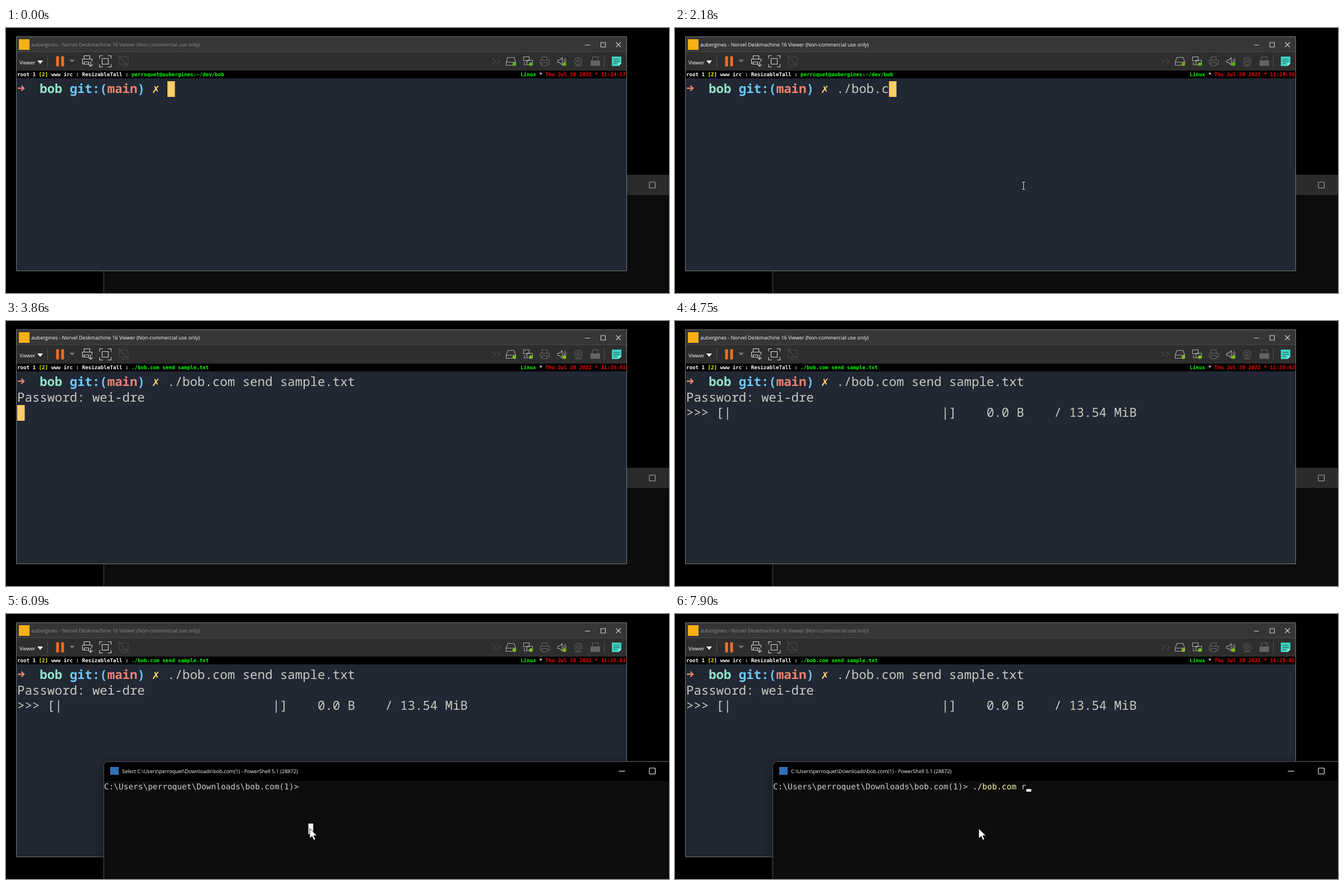
An HTML page for the animation above (8000 ms loop, 1183x473 px).

```html
<!DOCTYPE html>
<html lang="en">
<head>
<meta charset="utf-8">
<title>Sending a file between two terminals</title>
<style>
  html, body { margin: 0; width: 100%; height: 100%; overflow: hidden; background: #000; }
  svg { display: block; width: 1183px; height: 473px; }
  text { white-space: pre; text-rendering: geometricPrecision; }
  .ui { font: 9.07px "Open Sans", "Noto Sans", sans-serif; fill: #fff; }
  .bar { font: bold 9.17px "DejaVu Sans Mono", monospace; fill: #fff; }
  .term { font: 22.33px "Noto Sans Mono", monospace; fill: #cccac2; }
  .term .b { font-weight: 700; }
  .con { font: 14.43px "DejaVu Sans Mono", monospace; fill: #ccc; }
  .line { fill: none; stroke: #d4d4d4; stroke-width: 1.1; }
  .soft { stroke: #aaa; }
  .dim { stroke: #666; }
  .off { stroke: #464c50; }
  .lit { stroke: #fff; }
</style>
</head>
<body>
<svg viewBox="0 0 1183 473">
  <defs>
    <filter id="shadow" x="-10%" y="-20%" width="120%" height="140%">
      <feDropShadow dx="0" dy="6" stdDeviation="11" flood-color="#000" flood-opacity=".45"/>
    </filter>
  </defs>
  <rect width="1183" height="473"/>

  <!-- shell window while it lies behind -->
  <rect x="174" y="262" width="1020" height="220" fill="#0c0c0c"/>
  <rect x="174" y="262" width="1020" height="36" fill="#2b2b2b"/>
  <path d="M174.5 434v39" stroke="#4c4c4c"/>
  <rect x="1148" y="275" width="10.5" height="10.5" rx="1" class="line soft"/>

  <!-- virtual machine window -->
  <rect x="18" y="15" width="1090" height="419" rx="1" fill="#777"/>
  <rect x="19" y="16" width="1088" height="27" fill="#363636"/>
  <rect x="19" y="42.5" width="1088" height="34" fill="#2e2e2e"/>
  <rect x="19" y="42" width="1088" height="1" fill="#484848"/>
  <rect x="19" y="76" width="1088" height="14"/>
  <rect x="19" y="90" width="1088" height="343" fill="#212733"/>
  <rect x="23" y="20" width="19" height="19" fill="#f5b014"/>
  <text id="vmTitle" class="ui" x="45" y="33">aubergines - Norvel Deskmachine 16 Viewer (Non-commercial use only)</text>
  <path class="line" d="M1033 30.5h9M1061.5 26h8v8h-8zM1088.5 25.5l8.5 8.500m0-8.500l-8.500 8.500"/>

  <!-- toolbar -->
  <text class="ui" x="24" y="64.5">Viewer</text>
  <path d="M56 58h10l-5 6z" fill="#fff"/>
  <path d="M74.5 49v21M1067.5 49v21" stroke="#555"/>
  <path d="M89.5 50.5h5v18h-5zM98.5 50.5h5v18h-5z" fill="#f36f21"/>
  <path d="M113 56.5h10l-5 5z" fill="#777"/>
  <path class="line" d="M139.5 55v-5.5h10V55M139 64h-2.5v-8.5h17V60M139.5 60.5h8v4h-8zM151 60v8m-3.5-3l3.5 3.5 3.5-3.5"/>
  <path class="line" d="M167 54.5v-5h5.5M182 49.5h5.5v5M187.5 64.5v5H182M172.5 69.5H167v-5M171.5 54.5h11v10h-11z"/>
  <path class="line off" d="M202 51.5h16v13h-16zM200 49l19 20M206 68.5h8"/>
  <path class="line off" d="M868 55l6 4.5-6 4.5m8-9l6 4.5-6 4.5"/>
  <path class="line soft" d="M892.5 61l3-8.5h11l3 8.5v5.5h-17zM892.5 61h17"/>
  <path class="line soft" d="M923.5 51.5h10v7h-10zM929.5 57.5h10v8h-10zM925 61v5h3"/>
  <path class="line dim" d="M956.5 57v-5.5h9V57M956 64.5h-2.5v-7h16v7H966M956.5 61.5h9v6h-9z"/>
  <path class="line soft" d="M984.5 57.5h3l5-4.5v13l-5-4.5h-3zM995 56q2.5 3.5 0 7M997 53.5q4.5 6 0 11"/>
  <g class="line dim"><circle cx="1021" cy="59" r="6.5"/><circle cx="1021" cy="59" r="2.5"/><path d="M1015 67.5h12"/></g>
  <path d="M1043 58h17v9.5h-17z" fill="#646464"/>
  <path class="line dim" d="M1046.5 58v-6.5h10V58"/>
  <g id="lamps"><circle cx="907" cy="64.5" r="3.2"/><circle cx="936.5" cy="64.5" r="3.2"/><circle cx="996.5" cy="64.5" r="3.2"/></g>
  <path d="M1081 51h17v12l-5 5h-12z" fill="#3ed0c0"/>
  <path d="M1084 56h11M1084 59.5h11M1084 63h6" stroke="#1f5f5a"/>
  <path d="M1093 68v-5h5z" fill="#b9f1e9"/>

  <!-- status bar -->
  <text class="bar" x="20" y="86">root 1 <tspan fill="#ff0">[2]</tspan> www irc : ResizableTall : <tspan id="task" fill="#0f0"></tspan></text>
  <text class="bar" x="918.3" y="86"><tspan fill="#0f0">Linux</tspan> * <tspan id="clock" fill="#f00"></tspan></text>

  <!-- terminal -->
  <path d="M21 107.5h10M27.5 103l4.5 4.5-4.5 4.5" fill="none" stroke="#ec8270" stroke-width="2.3"/>
  <g class="term">
    <text class="b" x="60.2" y="116" fill="#95e6cb">bob <tspan fill="#6fc8f5">git:(</tspan><tspan fill="#ec8270">main</tspan><tspan fill="#6fc8f5">)</tspan></text>
    <text x="260" y="116" style="font:18px 'DejaVu Sans',sans-serif" fill="#ffd173">✗</text>
    <text id="typed" x="288" y="116"></text>
    <text id="secret" x="20" y="143.5">Password: wei-dre</text>
    <text id="progress" x="20" y="171"></text>
  </g>
  <rect id="block" width="13.4" height="28" fill="#ffcc66"/>

  <!-- shell window in front -->
  <g id="shell">
    <g filter="url(#shadow)">
      <rect x="174.5" y="263.5" width="1040" height="240" rx="8" fill="#0c0c0c" stroke="#555"/>
    </g>
    <path d="M175 298v-26a8 8 0 0 1 8-8h1000v34z"/>
    <rect x="186" y="273" width="15" height="14" fill="#2f6fb5"/>
    <text id="shellTitle" class="ui" x="207" y="283.7"></text>
    <path class="line lit" d="M1093.5 280.5h11"/>
    <rect x="1148" y="275" width="10.5" height="10.5" rx="1" class="line lit"/>
    <text class="con" x="175" y="313">C:\Users\perroquet\Downloads\bob.com(1)&gt; <tspan id="cmd" fill="#f9f1a5"></tspan><tspan id="arg"></tspan></text>
    <rect id="under" y="312.5" width="8.7" height="4.5" fill="#fff"/>
    <rect id="pick" x="539.5" y="374" width="8.7" height="19" fill="#f2f2f2"/>
  </g>

  <!-- pointers -->
  <g id="beam" fill="none">
    <path d="M-3-6.5h6M-3 6.5h6M0-6.5v13" stroke="#000" stroke-width="3"/>
    <path d="M-3-6.5h6M-3 6.5h6M0-6.5v13" stroke="#fff" stroke-width="1.2"/>
  </g>
  <path id="arrow" d="M0 0v17.5l4.2-3.8 3 6.8 3-1.3-3-6.6h5.8z" fill="#fff" stroke="#000" stroke-width=".8"/>
</svg>
<script>
const LOOP = 8000;
const TERM_CELL = 13.4, SHELL_CELL = 8.69;
const el = id => document.getElementById(id);
const show = (id, on) => { el(id).style.display = on ? "" : "none"; };
const put = (id, text) => { if (el(id).textContent !== text) el(id).textContent = text; };
const place = (id, x, y) => el(id).setAttribute("transform", `translate(${x} ${y})`);
const within = (t, a, b) => t >= a && t < b;
const ease = p => p * p * (3 - 2 * p);

const command = "./bob.com send sample.txt ";
const reply = "./bob.com r";

// key presses: [time, characters shown from then on]
const sendKeys = [
  [1390, 1], [1490, 2], [1590, 3], [1690, 4], [1850, 5], [1990, 6],
  [2180, 7], [2260, 8], [2350, 9], [2450, 10], [2550, 11], [2650, 12], [2750, 13], [2850, 14],
  [3050, 15], [3120, 16], [3250, 17], [3380, 26]
];
const replyKeys = [
  [6620, 1], [6750, 2], [7020, 3], [7090, 4], [7220, 5],
  [7370, 6], [7460, 7], [7550, 8], [7630, 9], [7750, 10], [7900, 11]
];
// pointer strokes: [shape, from, until, move time, start, end]
const strokes = [
  ["beam", 270, 3860, 400, [664, 425], [622, 281.5]],
  ["beam", 4540, 4750, 210, [624, 300], [609, 362]],
  ["arrow", 5340, LOOP, 400, [562, 473], [542, 383]]
];

const count = (keys, t) => keys.reduce((n, [at, k]) => t >= at ? k : n, 0);

function movePointers(t) {
  show("beam", false);
  show("arrow", false);
  for (const [id, from, until, span, a, b] of strokes) {
    if (!within(t, from, until)) continue;
    const p = ease(Math.min(1, (t - from) / span));
    show(id, true);
    place(id, a[0] + (b[0] - a[0]) * p, a[1] + (b[1] - a[1]) * p);
  }
}

function clockText(t) {
  const s = 57 + Math.floor((t + 380) / 1000);
  const two = n => String(n).padStart(2, "0");
  return `Thu Jul 28 2022 * 11:${two(24 + Math.floor(s / 60))}:${two(s % 60)}`;
}

function drawTerminal(t) {
  const n = count(sendKeys, t);
  put("typed", command.slice(0, n));
  put("task", t < 3650 ? "perroquet@aubergines:~/dev/bob" : "./bob.com send sample.txt");
  put("clock", clockText(t));
  show("secret", t >= 3780);
  show("progress", t >= 4000);
  show("block", t < 4000 && !within(t, 1190, 1390));
  const row = t < 3580 ? 0 : t < 3780 ? 1 : 2;
  place("block", 20 + (row ? 0 : 20 + n) * TERM_CELL, 95 + row * 27.5);
  el("vmTitle").style.fill = within(t, 530, 5010) ? "#fff" : "#8c8c8c";
  el("lamps").setAttribute("fill", t < 3650 ? "#5cb615" : "#7fbf1a");
}

function drawShell(t) {
  const n = count(replyKeys, t);
  const picking = within(t, 5750, 6620);
  show("shell", t >= 5010);
  show("pick", picking);
  put("shellTitle", (picking ? "Select " : "") +
    "C:\\Users\\perroquet\\Downloads\\bob.com(1) - PowerShell 5.1 (28872)");
  put("cmd", reply.slice(0, Math.min(n, 9)));
  put("arg", reply.slice(9, Math.max(n, 9)));
  show("under", within(t, 5560, 6090) || t >= 6620);
  el("under").setAttribute("x", 175 + (41 + n) * SHELL_CELL);
}

el("progress").textContent =
  ">>> [|" + " ".repeat(28) + "|]    0.0 B    / 13.54 MiB";

const start = performance.now();
function frame() {
  const t = (performance.now() - start) % LOOP;
  drawTerminal(t);
  drawShell(t);
  movePointers(t);
  requestAnimationFrame(frame);
}
frame();
</script>
</body>
</html>
```
